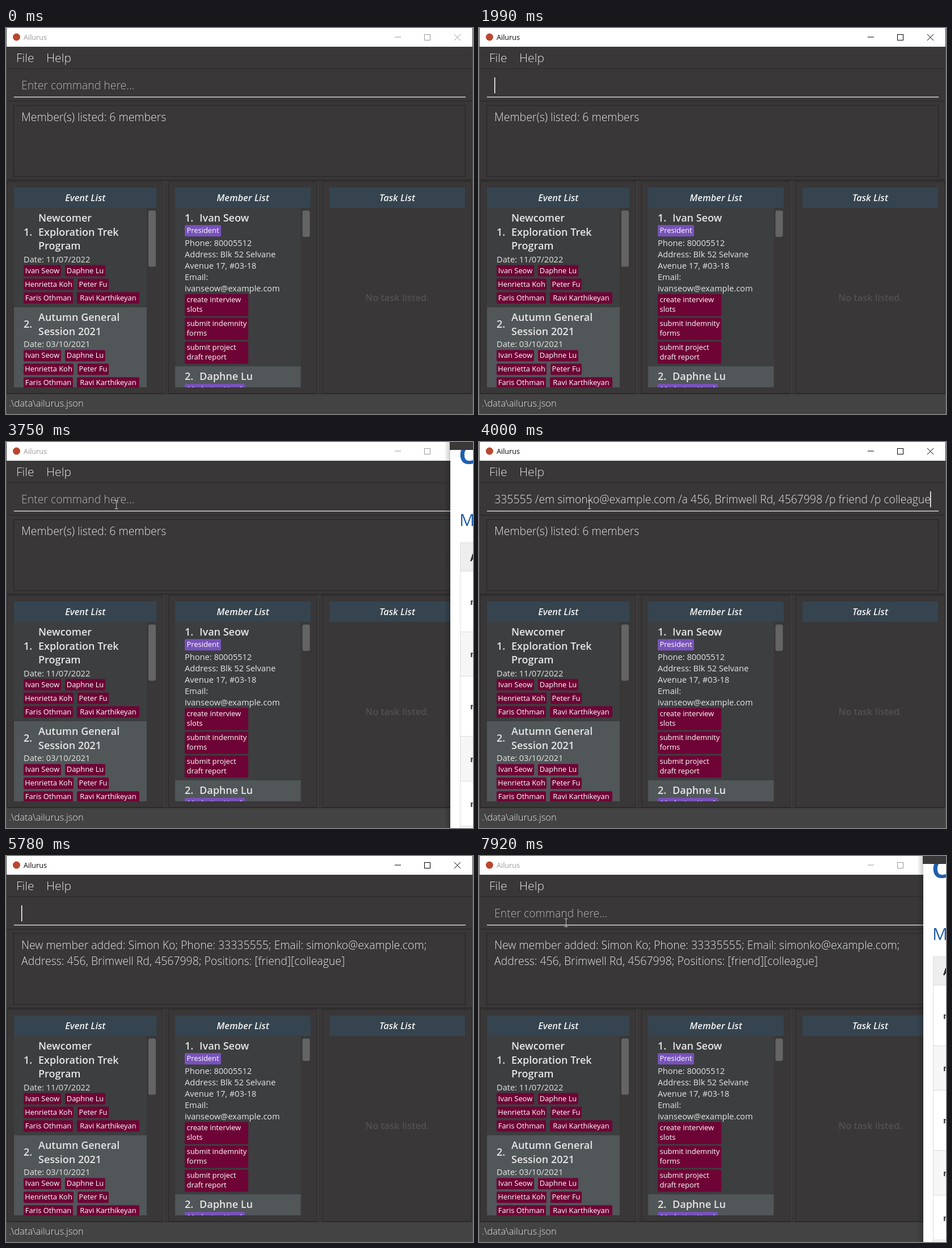
These frames come from a looping animation (823x680 px, 7990 ms). An HTML page with a canvas:

```html
<!DOCTYPE html>
<html lang="en">
<head>
<meta charset="utf-8">
<title>Ailurus</title>
<style>
html, body { margin: 0; width: 823px; height: 680px; overflow: hidden; background: #393737; }
canvas { display: block; }
</style>
</head>
<body>
<canvas id="stage" width="823" height="680"></canvas>
<script>
const ctx = document.getElementById('stage').getContext('2d');
const LOOP = 7990;
const FONT = '"Open Sans", "Noto Sans", sans-serif';
const BG = '#393737', EDGE = '#2b2929', PALE = '#e6e6e6';
const TAG = '#6e0436', ROLE = '#7852ba';
const FIELD_SIZE = 19.45;

const COMMAND = 'add /m Simon Ko /ph 33335555 /em simonko@example.com /a 456, Brimwell Rd, 4567998 /p friend /p colleague';
const LISTED = ['Member(s) listed: 6 members'];
const ADDED = [
  'New member added: Simon Ko; Phone: 33335555; Email: simonko@example.com;',
  'Address: 456, Brimwell Rd, 4567998; Positions: [friend][colleague]'
];
const PEOPLE = [
  ['Ivan Seow', 31, 66, 0], ['Daphne Lu', 104, 71, 0],
  ['Henrietta Koh', 31, 88, 24], ['Peter Fu', 126, 55, 24],
  ['Faris Othman', 31, 87, 48], ['Ravi Karthikeyan', 125, 110, 48]
];

// Pointer journeys: start, end, visible until, from, to, easing
const easeOut = p => 1 - (1 - p) ** 2, easeIn = p => p * p;
const MOVES = [
  [250, 720, 1060, [780, 330], [191, 108], easeOut],
  [1060, 1430, 1430, [191, 108], [778, 202], easeIn],
  [3390, 3730, 4790, [760, 330], [194, 110], easeOut],
  [4790, 5120, 5120, [194, 110], [780, 300], easeIn],
  [7780, 7920, LOOP, [395, 232], [153, 117], easeOut]
];

const between = (t, a, b) => t >= a && t < b;

function rect(x, y, w, h, color, radius = 0) {
  ctx.fillStyle = color;
  ctx.beginPath();
  ctx.roundRect(x, y, w, h, radius);
  ctx.fill();
}

function frame(x, y, w, h, color = EDGE, width = 1) {
  ctx.strokeStyle = color;
  ctx.lineWidth = width;
  ctx.strokeRect(x + .5, y + .5, w - 1, h - 1);
}

function text(str, x, y, size, weight = 400, color = PALE, align = 'left') {
  ctx.font = `${weight} ${size}px ${FONT}`;
  ctx.fillStyle = color;
  ctx.textAlign = align;
  ctx.fillText(str, x, y);
}

function clipped(x, y, w, h, paint) {
  ctx.save();
  ctx.beginPath();
  ctx.rect(x, y, w, h);
  ctx.clip();
  paint();
  ctx.restore();
}

function line(points, color, width = 1) {
  ctx.strokeStyle = color;
  ctx.lineWidth = width;
  ctx.beginPath();
  points.forEach(([x, y], i) => i % 2 ? ctx.lineTo(x, y) : ctx.moveTo(x, y));
  ctx.stroke();
}

function tag(label, x, y, w, color = TAG) {
  rect(x, y, w, 20, color, 2);
  text(label, x + w / 2, y + 14, 12.9, 400, '#fff', 'center');
}

function titleBar(active) {
  const ink = active ? '#000' : '#999';
  rect(1, 0, 821, 33, '#fff');
  ctx.fillStyle = '#b9472f';
  ctx.beginPath();
  ctx.arc(18.5, 16, 6.5, 0, 7);
  ctx.fill();
  text('Ailurus', 31, 21, 12.6, 400, ink);
  line([[685, 16], [696, 16]], ink);
  frame(737, 11, 11, 11, ink);
  line([[790, 11], [801, 22], [801, 11], [790, 22]], ink);
}

function panel(x, w, headX, headW, title) {
  frame(x, 270, w, 374);
  rect(headX, 281, headW, 36, '#35444f');
  text(title, headX + headW / 2, 305, 16.4, 'italic 600', '#f2f2f2', 'center');
}

function eventCard(number, lines, date, top, numberY, dateY) {
  text(number + '.', 31, numberY, 18, 600);
  lines.forEach((str, i) => text(str, 57, top + i * 24.5, 18, 600));
  text('Date: ' + date, 31, dateY, 14.6);
  for (const [name, x, w, dy] of PEOPLE) tag(name, x, dateY + 5 + dy, w);
}

function eventList() {
  panel(2, 275, 14, 251.5, 'Event List');
  clipped(14, 317, 234, 316, () => {
    rect(14, 317, 234, 175, '#3c3e3f');
    rect(14, 492, 234, 142, '#515658');
    eventCard(1, ['Newcomer', 'Exploration Trek', 'Program'], '11/07/2022', 341, 366, 412.5);
    eventCard(2, ['Autumn General', 'Session 2021'], '03/10/2021', 516, 528, 562.3);
  });
  rect(251, 321.5, 13, 99, '#646464', 3);
}

function memberList(thumb) {
  panel(286, 263, 298, 239, 'Member List');
  clipped(298, 317, 221.5, 316, () => {
    rect(298, 317, 222, 279, '#3c3e3f');
    rect(298, 596, 222, 38, '#515658');
    text('1.', 315, 341, 18, 600);
    text('Ivan Seow', 341, 341, 18, 600);
    tag('President', 315, 347.3, 64, ROLE);
    ['Phone: 80005512', 'Address: Blk 52 Selvane', 'Avenue 17, #03-18', 'Email:', 'ivanseow@example.com']
      .forEach((str, i) => text(str, 315, 384 + i * 20.1, 14.6));
    [['create interview', 'slots'], ['submit indemnity', 'forms'], ['submit project', 'draft report']]
      .forEach((task, i) => {
        rect(315, 468.5 + i * 42, 112, 39, TAG, 2);
        task.forEach((str, j) => text(str, 318.5, 482.8 + i * 42 + j * 17.6, 12.9, 400, '#fff'));
      });
    text('2.', 315, 620, 18, 600);
    text('Daphne Lu', 341, 620, 18, 600);
    tag('Marketing Head', 315, 627, 106, ROLE);
  });
  rect(522.5, 321.5, 13, thumb, '#646464', 3);
}

function browserEdge() {
  const shade = ctx.createLinearGradient(772, 0, 783, 0);
  shade.addColorStop(0, 'rgba(0,0,0,0)');
  shade.addColorStop(1, 'rgba(0,0,0,.2)');
  rect(772, 0, 11, 680, shade);
  rect(783, 0, 40, 680, '#fff');
  rect(782, 0, 41, 14, '#3b3839');
  clipped(783, 14, 40, 666, () => {
    text('C', 798, 39, 46, 700, '#1f5fae');
    text('M', 799, 147.5, 30, 400, '#2360a5');
    const rows = [177, 227, 334, 412, 518, 597, 676, 760];
    rows.slice(0, -1).forEach((y, i) => {
      const h = rows[i + 1] - y;
      rect(800, y, 40, h, i === 0 ? '#eee' : i % 2 ? '#fff' : '#f6f6f6');
      frame(800, y, 40, h + 1, '#dcdcdc');
      if (i === 0) text('A', 818, 210, 17, 700, '#222');
      else text('m', 818, (y + rows[i + 1]) / 2 + 6, 15, 700, '#333');
    });
  });
}

function pointer(t) {
  const move = MOVES.find(([start, , until]) => between(t, start, until));
  if (!move) return;
  const [start, end, , from, to, ease] = move;
  const p = ease(Math.min(1, (t - start) / (end - start)));
  const x = Math.round(from[0] + (to[0] - from[0]) * p) + .5;
  const y = Math.round(from[1] + (to[1] - from[1]) * p) + .5;
  line([[x, y - 7], [x, y + 7], [x - 3, y - 7], [x + 3, y - 7], [x - 3, y + 7], [x + 3, y + 7]], '#c9c9c9');
}

function draw(t) {
  const active = between(t, 590, 2450) || between(t, 3800, 6110);
  const covered = between(t, 2450, 3800) || t >= 6110;
  const typed = between(t, 4000, 4860);
  const added = t >= 4860;
  const caretOn = active && !between(t, 1530, 1990) && !between(t, 4460, 4860) && !between(t, 5320, 5780);

  rect(0, 0, 823, 680, BG);
  titleBar(active);
  text('File', 18, 60, 21, 300);
  text('Help', 71, 60, 21, 300);
  rect(1, 71, 821, 1, EDGE);

  if (typed) clipped(27, 80, 770, 40, () => text(COMMAND, 796, 108, FIELD_SIZE, 300, PALE, 'right'));
  else if (!active) text('Enter command here...', 27, 108, FIELD_SIZE, 300, '#b4b4b8');
  if (caretOn) rect(typed ? 795 : 27, 87, 1.5, 28, '#fff');
  rect(14, 121, 796, 1.3, '#eee');
  rect(1, 128, 821, 1.5, EDGE);

  frame(13, 136, 797, 126, EDGE, 1.5);
  (added ? ADDED : LISTED).forEach((str, i) => text(str, 27, 164 + i * 28, FIELD_SIZE, 300));

  rect(1, 267, 821, 2, EDGE);
  eventList();
  memberList(added ? 39.5 : 46.5);
  panel(558, 263, 570, 239, 'Task List');
  for (const x of [277, 549]) rect(x, 269, 1, 375, '#4a4949');
  text('No task listed.', 689.5, 481, 16.4, 600, '#525252', 'center');

  rect(0, 644, 823, 36, '#434343');
  rect(0, 644, 823, 1, EDGE);
  text('.\\data\\ailurus.json', 5, 667, 16.4, 300);
  rect(0, 33, 1, 647, '#555');
  rect(822, 33, 1, 647, '#555');

  if (covered) browserEdge();
  pointer(t);
}

function tick(now) {
  draw(now % LOOP);
  requestAnimationFrame(tick);
}
requestAnimationFrame(tick);
</script>
</body>
</html>
```
